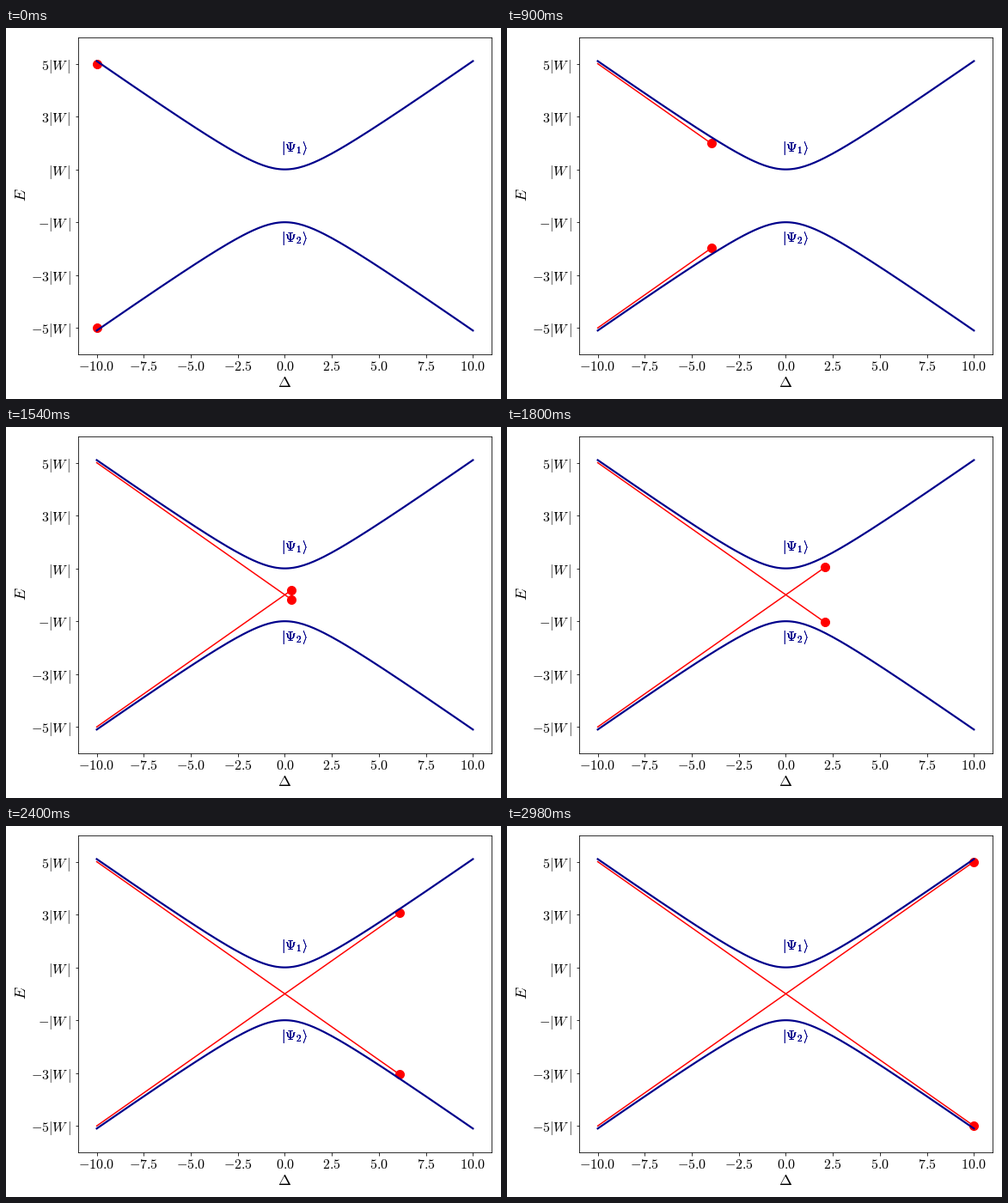
Animation, 576 px wide and 432 px high, one loop 3000 ms. Source, as a matplotlib script:

```python
import numpy as np
import matplotlib.pyplot as plt
from matplotlib.animation import FuncAnimation

W, H = 576, 432
FRAMES, INTERVAL = 150, 20

plt.rcParams.update({"mathtext.fontset": "cm", "font.size": 16})

fig = plt.figure(figsize=(W / 72, H / 72), dpi=72)
left, right, top, bottom = 83.7, 565.2, 10.8, 380
ax = fig.add_axes([left / W, 1 - bottom / H,
                   (right - left) / W, (bottom - top) / H])
ax.set_xlim(-11, 11)
ax.set_ylim(-6, 6)

xticks = np.arange(-10, 10.1, 2.5)
ax.set_xticks(xticks, [f"${v:.1f}$" for v in xticks])
ax.set_yticks([-5, -3, -1, 1, 3, 5],
              [rf"${c}|W\,|$" for c in ("-5", "-3", "-", "", "3", "5")])
ax.tick_params(axis="y", pad=4.5)

# Axis names, placed in pixels
fig.text((left + right) / 2 / W, 1 - 418 / H, r"$\Delta$",
         size=18, ha="center", va="baseline")
fig.text(18.3 / W, 1 - 194.5 / H, "$E$", size=18, rotation=90,
         ha="center", va="center")

# Coupled levels: E = ±sqrt((Δ/2)² + W²) with W = 1
delta = np.linspace(-10, 10, FRAMES)
coupled = np.sqrt(delta**2 / 4 + 1)
for sign, name in ((1, 1), (-1, 2)):
    ax.plot(delta, sign * coupled, color="darkblue", lw=2.2, zorder=4)
    # \mathcal{i} is the text-size right angle bracket;
    # overprinting gives the heavier weight
    for _ in range(3):
        ax.text(-0.2, 1.7 * sign - 0.03, rf"$|\Psi_{name}\mathcal{{i}}$",
                color="darkblue", zorder=5)

# Uncoupled levels: E = ±Δ/2, each a trail with a moving dot
slopes = (-0.5, 0.5)
trails = [ax.plot([], [], color="red", lw=1.5, zorder=2)[0] for _ in slopes]
dots = [ax.plot([], [], "o", color="red", ms=10, zorder=3)[0] for _ in slopes]


def update(i):
    x = delta[:i + 1]
    for slope, trail, dot in zip(slopes, trails, dots):
        trail.set_data(x, slope * x)
        dot.set_data(x[-1:], slope * x[-1:])
    return trails + dots


anim = FuncAnimation(fig, update, frames=FRAMES, interval=INTERVAL,
                     repeat=True, repeat_delay=0)
plt.show()
```
